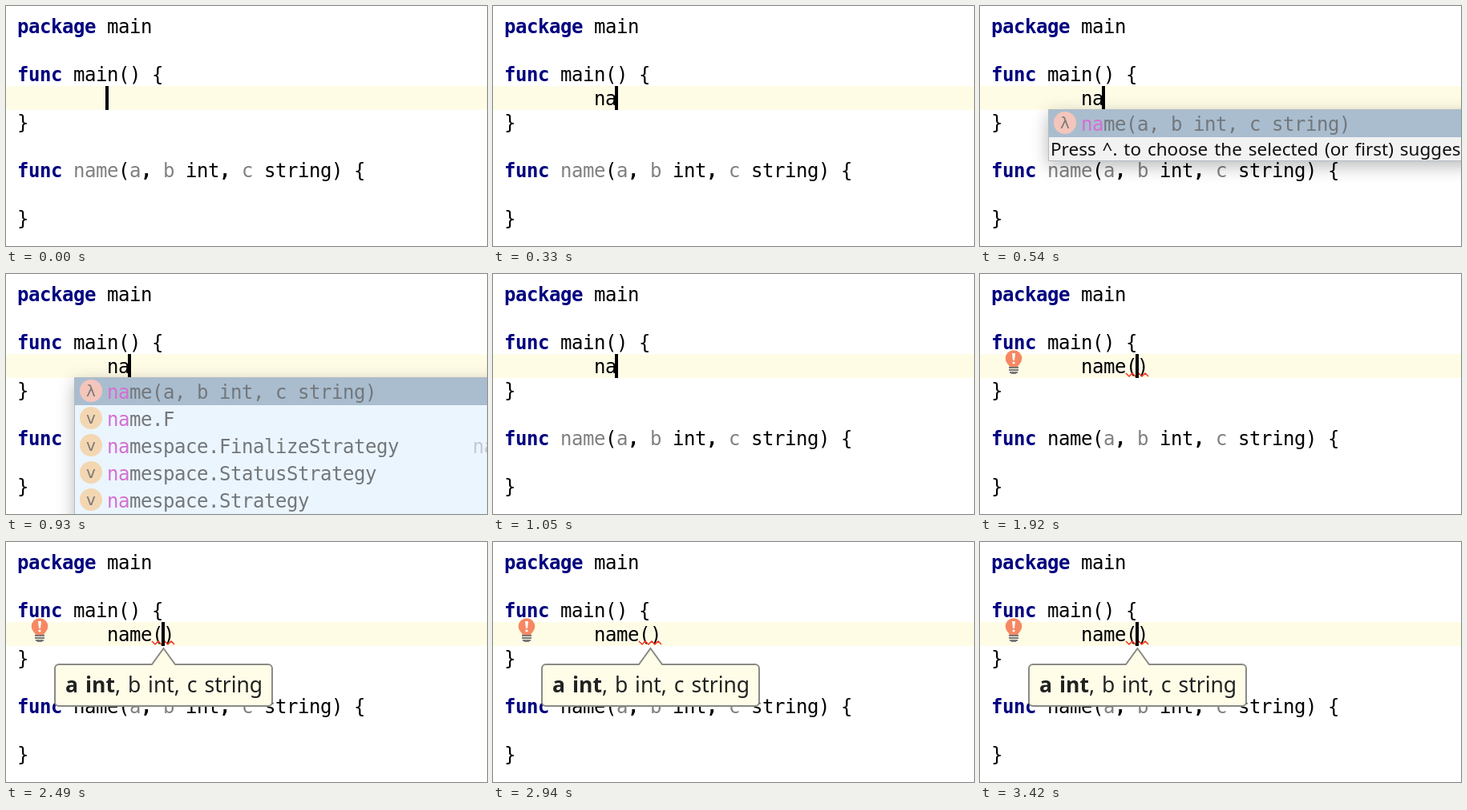
Animation, 600 px wide and 300 px high, one loop 3.51 s. Source, as an HTML page with a canvas:

```html
<!DOCTYPE html>
<html lang="en">
<head>
<meta charset="utf-8">
<title>Code completion</title>
<style>
html, body { margin: 0; width: 100%; height: 100%; overflow: hidden; background: #fff; }
canvas { display: block; width: 100vw; height: 100vh; }
</style>
</head>
<body>
<canvas id="stage" width="600" height="300"></canvas>
<script>
const ctx = document.getElementById('stage').getContext('2d');
const LOOP = 3510, LEFT = 14, CELL = 14, LINE = 30;
const MONO = '24px "DejaVu Sans Mono", monospace';
const SANS = '"Noto Sans", sans-serif';
const NAVY = '#000080', GRAY = '#808080', BLACK = '#000', DIM = '#73777b', PINK = '#d46fd2';

function rect(x, y, w, h, color) {
  ctx.fillStyle = color;
  ctx.fillRect(x, y, w, h);
}

function disc(x, y, r, color) {
  ctx.fillStyle = color;
  ctx.beginPath();
  ctx.arc(x, y, r, 0, Math.PI * 2);
  ctx.fill();
}

// Draws runs of monospaced text: [text, color, bold]
function code(x, y, ...runs) {
  ctx.letterSpacing = '-0.45px';
  for (const [text, color, bold] of runs) {
    ctx.font = (bold ? 'bold ' : '') + MONO;
    ctx.fillStyle = color;
    ctx.fillText(text, x, y);
    x += text.length * CELL;
  }
  ctx.letterSpacing = '0px';
}

function label(text, x, y, font, color) {
  ctx.wordSpacing = '2px';
  ctx.font = font;
  ctx.fillStyle = color;
  ctx.fillText(text, x, y);
  const width = ctx.measureText(text).width;
  ctx.wordSpacing = '0px';
  return x + width;
}

function editor(typed, nameColor) {
  const base = row => 34 + row * LINE;
  rect(0, 0, 600, 300, '#fff');
  rect(0, 100, 600, 30, '#fffce6');
  code(LEFT, base(0), ['package', NAVY, true], [' main', BLACK]);
  code(LEFT, base(2), ['func', NAVY, true], [' main() {', BLACK]);
  code(LEFT + 8 * CELL, base(3), [typed, BLACK]);
  code(LEFT, base(4), ['}', BLACK]);
  code(LEFT, base(6), ['func', NAVY, true], [' name', nameColor], ['(', BLACK],
    ['a', GRAY], [', ', BLACK, true], ['b', GRAY], [' int', BLACK],
    [', ', BLACK, true], ['c', GRAY], [' string) {', BLACK]);
  code(LEFT, base(8), ['}', BLACK]);
}

function caret(column) {
  rect(LEFT + column * CELL - 2, 100, 4, 30, BLACK);
}

function squiggle() {
  ctx.strokeStyle = '#f03222';
  ctx.lineWidth = 1.5;
  ctx.beginPath();
  for (let i = 0; i <= 7; i++) ctx.lineTo(182 + i * 4, i % 2 ? 128 : 124);
  ctx.stroke();
}

function bulb() {
  disc(42, 105.5, 10.3, '#f58863');
  ctx.fillStyle = '#f58863';
  ctx.beginPath();
  ctx.moveTo(33.5, 110);
  ctx.lineTo(37, 116);
  ctx.lineTo(47, 116);
  ctx.lineTo(50.5, 110);
  ctx.fill();
  ctx.fillStyle = '#fff';
  ctx.beginPath();
  ctx.moveTo(40, 99);
  ctx.lineTo(44, 99);
  ctx.lineTo(43, 108);
  ctx.lineTo(41, 108);
  ctx.fill();
  disc(42, 111, 1.6, '#fff');
  rect(36, 116, 12, 2, '#777');
  rect(36, 119, 12, 2, '#777');
  rect(37, 122, 10, 2, '#777');
  rect(39, 124, 6, 1, '#777');
}

function popupRow(index, rest, symbol, fill) {
  const y = 130 + index * 34;
  disc(106, y + 16, 14, fill);
  ctx.textAlign = 'center';
  label(symbol, 106, y + 23, '20px "DejaVu Sans", sans-serif', '#7d7a78');
  ctx.textAlign = 'left';
  code(126, y + 26, ['na', PINK], [rest, DIM]);
}

function popup(expanded) {
  const bottom = expanded ? 330 : 194;
  ctx.save();
  ctx.shadowColor = 'rgba(0,0,0,0.28)';
  ctx.shadowBlur = 20;
  ctx.shadowOffsetY = 6;
  rect(85, 129, 540, bottom - 129, '#b4bcc3');
  ctx.restore();
  rect(86, 130, 514, bottom - 131, expanded ? '#ebf5fe' : '#f2f2f2');
  rect(86, 130, 514, 34, '#a9bdcf');
  popupRow(0, 'me(a, b int, c string)', 'λ', '#f4c6bb');
  if (expanded) {
    ['me.F', 'mespace.FinalizeStrategy', 'mespace.StatusStrategy', 'mespace.Strategy']
      .forEach((rest, i) => popupRow(i + 1, rest, 'v', '#f3d7b2'));
    code(582, 224, ['na', '#c3c9ce']);
  } else {
    label('Press ^. to choose the selected (or first) suggestion', 88, 187, '22.5px ' + SANS, '#111');
  }
}

function balloon(alpha) {
  ctx.save();
  ctx.globalAlpha = alpha;
  ctx.beginPath();
  ctx.moveTo(196.5, 133);
  ctx.lineTo(211, 153);
  ctx.arcTo(332, 153, 332, 205, 5);
  ctx.arcTo(332, 205, 61, 205, 5);
  ctx.arcTo(61, 205, 61, 153, 5);
  ctx.arcTo(61, 153, 182, 153, 5);
  ctx.lineTo(182, 153);
  ctx.closePath();
  ctx.fillStyle = '#fffde8';
  ctx.fill();
  ctx.strokeStyle = '#8a8a86';
  ctx.lineWidth = 2;
  ctx.stroke();
  const x = label('a int', 74, 188, 'bold 26.5px ' + SANS, '#222');
  label(', b int, c string', x, 188, '26.5px ' + SANS, '#222');
  ctx.restore();
}

function draw(t) {
  const typed = t < 120 ? '' : t < 330 ? 'n' : t < 1080 ? 'na' : 'name()';
  const column = 8 + (typed === 'name()' ? 5 : typed.length);
  const caretOff = (t >= 2010 && t < 2490) || (t >= 2940 && t < 3420);

  editor(typed, t < 1380 ? GRAY : BLACK);
  if (t >= 1380) squiggle();
  if (!caretOff) caret(column);
  if (t >= 1830) bulb();
  if (t >= 450 && t < 1050) popup(t >= 900);
  if (t >= 1980) balloon(Math.min(1, (Math.floor((t - 1980) / 30) + 1) / 4));
}

function tick() {
  draw(performance.now() % LOOP);
  requestAnimationFrame(tick);
}
tick();
</script>
</body>
</html>
```
